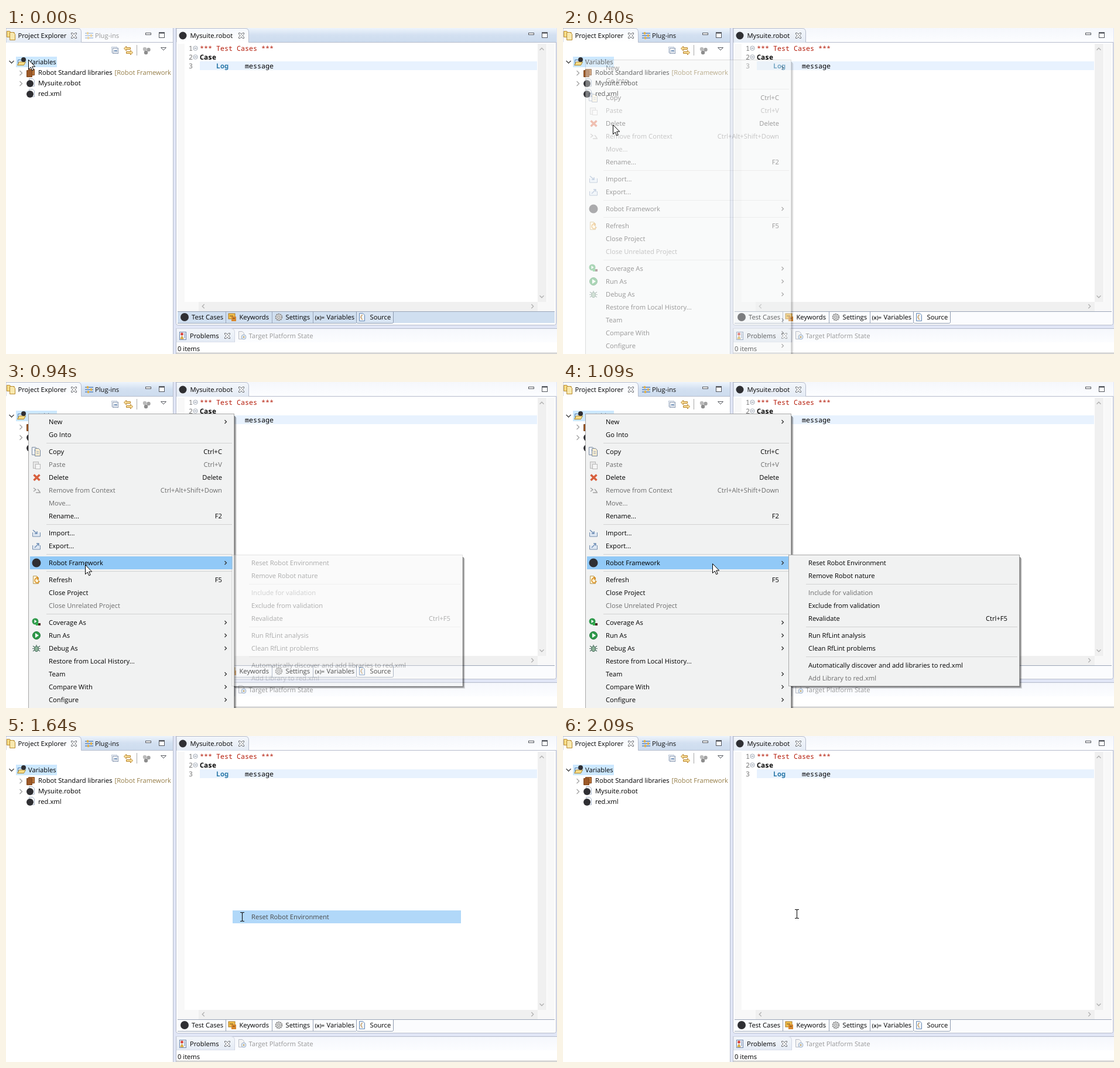
These frames come from a looping animation (941x557 px, 2.24 s). An HTML page:

```html
<!DOCTYPE html>
<html lang="en">
<head>
<meta charset="utf-8">
<title>Reset environment</title>
<style>
html, body { margin: 0; width: 100%; height: 100%; overflow: hidden; background: #fff; }
svg { display: block; width: 941px; height: 557px; }
text { font: 11.2px 'Open Sans', 'Noto Sans', sans-serif; text-rendering: geometricPrecision; white-space: pre; }
text.code { font: 11.667px 'Noto Sans Mono', 'DejaVu Sans Mono', monospace; }
text.bold { font-weight: 700; }
</style>
</head>
<body>
<svg id="stage" viewBox="0 0 941 557">
  <defs>
    <linearGradient id="on" x2="0" y2="1"><stop stop-color="#edf4fc"/><stop offset=".5" stop-color="#d3e0f1"/><stop offset="1" stop-color="#cddcee"/></linearGradient>
    <linearGradient id="off" x2="0" y2="1"><stop stop-color="#f5f7fc"/><stop offset="1" stop-color="#fcfdff"/></linearGradient>
    <linearGradient id="tab" x2="0" y2="1"><stop stop-color="#f5f8fd"/><stop offset="1" stop-color="#fff"/></linearGradient>
    <linearGradient id="tabOff" x2="0" y2="1"><stop stop-color="#f3f6fb"/><stop offset="1" stop-color="#e4ebf5"/></linearGradient>
  </defs>
</svg>
<script>
const LOOP = 2240;
const stage = document.getElementById('stage');
const EDGE = '#b6bccc', DIM = '#6d6d6d', PALE = '#a0a0a0', PICK = '#91c9f7', DARK = '#2f2f33';
let layer = stage;

function add(tag, attrs = {}, body = '') {
  const e = document.createElementNS('http://www.w3.org/2000/svg', tag);
  for (const k in attrs) e.setAttribute(k, attrs[k]);
  e.textContent = body;
  layer.appendChild(e);
  return e;
}
function group(draw) {
  const outer = layer, g = add('g');
  layer = g;
  draw();
  layer = outer;
  return g;
}
const rect = (x, y, width, height, fill, more = {}) => add('rect', { x, y, width, height, fill, ...more });
const path = (d, stroke, fill = 'none', width = 1) => add('path', { d, stroke, fill, 'stroke-width': width });
const dot = (cx, cy, r, fill = DARK, stroke = 'none') => add('circle', { cx, cy, r, fill, stroke });
// y is the middle of the line
const label = (x, y, s, fill = '#000', more = {}) => add('text', { x, y: y + 4, fill, ...more }, s);
const code = (x, y, s, fill, cls = '') => label(x, y, s, fill, { class: 'code ' + cls });

// Hold each value from its time until the next one.
function play(e, prop, table) {
  const frames = table.map(([t, v]) => ({ offset: t / LOOP, [prop]: v, easing: 'step-end' }));
  frames.push({ offset: 1, [prop]: table[table.length - 1][1] });
  e.animate(frames, { duration: LOOP, iterations: Infinity });
}
const move = (e, table) => play(e, 'transform', table.map(([t, x, y]) => [t, `translate(${x}px,${y}px)`]));
function swap(first, second, t) {
  play(first, 'opacity', [[0, 1], [t, 0]]);
  play(second, 'opacity', [[0, 0], [t, 1]]);
}

function closeMark(x, y) {
  path(`M${x - 4.5} ${y - 4.5}h2.5l2 2.5 2-2.5h2.5v2l-2.7 2.5 2.7 2.5v2h-2.5l-2-2.5-2 2.5h-2.5v-2l2.7-2.5-2.7-2.5z`, '#55585f', '#fff', .9);
}
function sizeMarks(x) {
  rect(x + .5, 8.5, 9, 3, '#fff', { stroke: '#55585f' });
  rect(x + 23.5, 7.5, 9, 9, '#fff', { stroke: '#55585f' });
  rect(x + 23, 7, 10, 2.5, '#55585f');
}
function chevron(x, y, stroke, dir, s = 3.5) {
  const d = { right: `M${x - s / 2} ${y - s}l${s} ${s}-${s} ${s}`, left: `M${x + s / 2} ${y - s}l-${s} ${s} ${s} ${s}`,
    down: `M${x - s} ${y - s / 2}l${s} ${s} ${s}-${s}`, up: `M${x - s} ${y + s / 2}l${s}-${s} ${s} ${s}` };
  path(d[dir], stroke, 'none', 1.3);
}
function sheet(x, y, fill = '#fff', stroke = '#8a98ad') {
  path(`M${x - 4.5} ${y - 6.5}h6l3 3v10h-9z`, stroke, fill);
}
function folder(x, y) {
  path(`M${x - 6.5} ${y + 5.5}v-10h5l1.5 2h6v8z`, '#b98b2d', '#f8dc85');
}
function sliders(x, y) {
  for (let i = -1; i < 2; i++) path(`M${x - 7} ${y + i * 4}h14`, '#5b86bd', 'none', 1.5);
  rect(x - 4, y - 6, 3, 4, '#e5b34a'); rect(x + 2, y - 2, 3, 4, '#e5b34a'); rect(x - 3, y + 2, 3, 4, '#e5b34a');
}

const barFill = on => on ? 'url(#on)' : 'url(#off)';
const tabFill = on => on ? 'url(#tab)' : 'url(#tabOff)';

function sideBar(on) {
  rect(0, 0, 285, 24, barFill(on));
  path('M0 24.5H285', EDGE);
  path('M0 25V.5H122Q128.5 .5 128.5 7V24.5', EDGE, tabFill(on));
  if (on) rect(0, 24, 128, 2, '#fff');
  group(() => sliders(142, 13)).setAttribute('opacity', on ? 1 : .5);
  label(152, 13, 'Plug-ins', on ? '#111' : '#999');
}
function editorBars(on) {
  rect(291, 0, 649, 24, barFill(on));
  path('M291 24.5H940', EDGE);
  path('M291 25V.5H408Q414.5 .5 414.5 7V24.5', EDGE, tabFill(on));
  if (on) rect(291, 24, 123, 2, '#fff');
  rect(293, 485, 644, 19, on ? '#d0dff0' : '#fbfcfe');
  path('M293 484.5H937M293 504.5H598', '#9aa5b8');
  path('M598.5 485V502.5Q598.5 504.5 600.5 504.5H659.5Q661.5 504.5 661.5 502.5V485', '#8c9ab0', on ? '#d9e5f3' : '#fff');
  for (const x of [375.5, 454.5, 524.5]) path(`M${x} 485V504`, '#9aa5b8');
}

function sidePanel() {
  folder(8, 10); sheet(11, 14, '#f8e8ae', '#b98b2d');
  label(20.5, 13, 'Project Explorer');
  closeMark(116, 13);
  sizeMarks(238);
  rect(182.5, 34.5, 9, 9, '#fff', { stroke: '#8797b0' });
  rect(180.5, 32.5, 9, 9, 'none', { stroke: '#b6c2d4' });
  path('M184.5 39h5', '#36649c', 'none', 1.4);
  path('M201.5 35l4-4v2.5h7v3h-7v2.5z', '#b7832c', '#fbe09b');
  path('M216.5 42l-4-4v2.5h-7v3h7v2.5z', '#b7832c', '#fbe09b');
  path('M223.5 29V47', '#a9a9a9');
  dot(237, 36, 3.2, '#bbb'); dot(243.5, 37, 3.2, '#a2a2a2'); dot(239, 42, 3.2, '#8d8d8d');
  path('M264.5 33.5h9l-4.5 4.5z', '#55585f', '#fff');

  rect(17, 49, 70, 18, '#cce8ff');
  chevron(9.5, 58, '#404040', 'down', 4);
  path('M20.5 63.5v-9h5l1.5 2h5v3', '#4d7cae', '#d8e8f8');
  path('M19.5 63.5l3-5.5h11l-3 5.5z', '#a7852f', '#f8dc85');
  dot(30, 54, 4);
  label(38, 58, 'Variables');
  chevron(25.5, 77, '#a2a2a2', 'right', 4);
  chevron(25.5, 95, '#a2a2a2', 'right', 4);
  path('M38.5 70.5h10v10h-10z', '#7b431b', '#bd783c');
  path('M35.5 72.5h9v11h-9z', '#7b431b', '#9c5928');
  label(55, 76, 'Robot Standard libraries');
  label(282, 76, '[Robot Framework', '#957d47', { 'text-anchor': 'end' });
  sheet(44, 93, '#f7f9fc', '#aab6c8'); dot(41, 95, 6);
  label(55, 94, 'Mysuite.robot');
  sheet(44, 111, '#f7f9fc', '#aab6c8'); dot(41, 113, 6);
  label(55, 112, 'red.xml');
}

function editor() {
  dot(302, 13, 6.5);
  label(314.5, 13, 'Mysuite.robot');
  closeMark(402, 13);
  sizeMarks(892);
  rect(293, 27, 12, 441, '#f8f8f8');
  rect(924, 27, 13, 457, '#f8f8f8');
  rect(293, 468, 644, 16, '#f8f8f8');
  rect(908, 27, 15, 441, '#f0f0f0');
  rect(329, 468, 579, 16, '#f0f0f0');
  chevron(915, 36, '#b0b0b0', 'up');
  chevron(915, 459, '#b0b0b0', 'down');
  chevron(337, 475.5, '#b0b0b0', 'left');
  chevron(899, 475.5, '#b0b0b0', 'right');
  rect(331, 57, 576, 15, '#e8f2fe');
  for (let i = 0; i < 3; i++) code(312, 35 + 15 * i, String(i + 1), '#787878');
  for (const y of [34.5, 49.5]) {
    dot(323.5, y, 3.6, '#fff', '#9aa3b0');
    path(`M321.5 ${y}h4`, '#7b8799');
  }
  code(331, 35, '*** Test Cases ***', '#b41a08');
  code(331, 50, 'Case', '#000', 'bold');
  code(359, 65, 'Log', '#2a78a8', 'bold');
  code(408, 65, 'message', '#000');

  dot(305, 494, 7);
  label(317, 494, 'Test Cases');
  rect(380, 488, 11, 9, '#f3c04d', { stroke: '#a87620' });
  rect(385, 493, 8, 8, '#d9882f');
  path('M382 492h6M387 496h4', '#5e451a');
  label(398.5, 494, 'Keywords');
  add('circle', { cx: 466, cy: 494, r: 5.3, fill: '#ddd', stroke: '#828282', 'stroke-width': 2, 'stroke-dasharray': '2.2 1.1' });
  dot(466, 494, 2, '#fff', '#777');
  label(477.5, 494, 'Settings');
  label(527.5, 493.5, '(x)=', '#333', { style: 'font-size:9px;font-weight:700' });
  label(547.5, 494, 'Variables');
  sheet(608, 494, '#eef4fb', '#6487b3');
  path('M609 490q-2 0-2 2t-1.5 2q1.5 0 1.5 2t2 2', '#c07c24');
  label(621.5, 494, 'Source');
}

function problems() {
  rect(291, 513, 650, 24, barFill(false));
  path('M290.5 557V513.5H941', EDGE);
  path('M291 513.5H384Q390.5 513.5 390.5 520V537H291z', '#d0d5e2', tabFill(false));
  rect(291, 537, 650, 20, '#fff');
  rect(296.5, 519.5, 11, 13, '#f4f7fc', { stroke: '#6e86aa' });
  dot(300.5, 523, 2.4, '#d8423a');
  path('M298 531l2.5-4.5 2.5 4.5z', '#b88720', '#f3c94f');
  path('M305 521v9', '#6e86aa');
  label(314, 526, 'Problems');
  closeMark(378, 526);
  sheet(402, 525, '#f4f4f4', '#b8bdc8');
  dot(406, 528, 4, '#dfe8f2', '#9fb3cc');
  dot(406, 528, 1.3, '#c6a35c');
  label(414.5, 526, 'Target Platform State', '#999');
  label(293, 548, '0 items');
  path('M291 555.5H941', '#a0a0a0');
}

function panel(x, y, w, h) {
  rect(x + .5, y + .5, w - 1, h - 1, '#f1f2f2', { stroke: '#a8a8a8' });
}
function shadow(x, y, w, h) {
  for (let i = 0; i < 4; i++)
    path(`M${x + w + i + .5} ${y + 4 + i}V${y + h + i + .5}H${x + 4 + i}`, `rgba(0,0,0,${.52 - i * .14})`);
}
// Rows are [text, shortcut or '>', disabled]; null is a separator.
function rows(list, x, top, right) {
  let y = top;
  for (const row of list) {
    if (!row) {
      path(`M${x - 4} ${y - 7.5}H${right}`, '#d2d2d2');
      y += 7;
      continue;
    }
    const [s, key, off] = row, fill = off ? DIM : '#000';
    label(x, y, s, fill);
    if (key === '>') chevron(right - 11, y, '#333', 'right', 3);
    else if (key) label(right - 17, y, key, fill, { 'text-anchor': 'end' });
    y += 22;
  }
}

function menuIcons() {
  sheet(49, 118, '#f4f7fc', '#76879d'); sheet(54, 120, '#f8ecd0', '#76879d');
  path('M48 117h3M52 119h4M52 122h4', '#8ca0bb');
  rect(46.5, 136.5, 9, 11, '#e6e6e6', { stroke: '#b9b9b9' });
  rect(50.5, 140.5, 8, 8, '#f5f5f5', { stroke: '#b9b9b9' });
  path('M47.5 158.5l10 9.5M57.5 158.5l-10 9.5', '#d85f3d', 'none', 3.5);
  path('M47 181l4 3-4 3M51 189h8M54 183l4 5', PALE, 'none', 1.4);
  for (const y of [258, 280]) path(`M45.5 ${y - 1}v7h13v-7`, '#758dad', '#dfe8f3');
  path('M46 253l7 6m0-4v4h-4', '#6d8db5', 'none', 1.4);
  path('M49 283l7-7m-4 0h4v4', '#6d8db5', 'none', 1.4);
  dot(52, 309, 7.5);
  sheet(51, 338, '#fff5da', '#b99a55');
  path('M54 335a4 4 0 1 0 3 5M52 333l3 2-2 3', '#d99127', 'none', 1.7);
  dot(50, 409, 5.5, '#2f9a4b'); path('M48.5 406l4 3-4 3z', 'none', '#fff');
  rect(51, 412, 8, 4, '#4b2525'); rect(51, 412, 4, 4, '#2fb04b');
  dot(52, 433, 6.5, '#2f9a4b', '#1e7436'); path('M50 429l6 4-6 4z', 'none', '#fff');
  path('M46 451l12 9M58 451l-12 9M45 455.5h14M52 449v4', '#4f6f64', 'none', 1.2);
  add('ellipse', { cx: 52, cy: 456, rx: 3.2, ry: 4.5, fill: '#8fb59a', stroke: '#3f6656' });
}

rect(0, 0, 941, 557, '#e1e6f6');
rect(0, 0, 285, 557, '#fff');
path('M285.5 0V557', EDGE);
rect(290.5, -4.5, 649, 512, '#fff', { stroke: EDGE, rx: 3 });
const sideOff = group(() => sideBar(false));
const sideOn = group(() => sideBar(true));
const editorOn = group(() => editorBars(true));
const editorOff = group(() => editorBars(false));
sidePanel();
editor();
problems();

let menuPick, subPick;
const menu = group(() => {
  shadow(38, 54, 352, 520);
  panel(38, 54, 352, 520);
  menuPick = rect(41, -11, 346, 22, PICK);
  rows([['New', '>'], ['Go Into'], null, ['Copy', 'Ctrl+C'], ['Paste', 'Ctrl+V', 1], ['Delete', 'Delete'],
    ['Remove from Context', 'Ctrl+Alt+Shift+Down', 1], ['Move...', '', 1], ['Rename...', 'F2'], null,
    ['Import...'], ['Export...'], null, ['Robot Framework', '>'], null, ['Refresh', 'F5'], ['Close Project'],
    ['Close Unrelated Project', '', 1], null, ['Coverage As', '>'], ['Run As', '>'], ['Debug As', '>'],
    ['Restore from Local History...'], ['Team', '>'], ['Compare With', '>'], ['Configure', '>']], 73, 68, 386);
  menuIcons();
});
const subShadow = group(() => shadow(385, 295, 395, 225));
const sub = group(() => {
  panel(385, 295, 395, 225);
  rows([['Remove Robot nature'], null, ['Include for validation', '', 1], ['Exclude from validation'],
    ['Revalidate', 'Ctrl+F5'], null, ['Run RfLint analysis'], ['Clean RfLint problems'], null,
    ['Automatically discover and add libraries to red.xml'], ['Add Library to red.xml', '', 1]], 419, 331, 776);
});
const choice = group(() => {
  subPick = rect(387, 298, 390, 22, PICK);
  label(419, 309, 'Reset Robot Environment');
});
const arrow = group(() => path('M.5 .5V16.5L4.2 13 6.7 18.7 9.2 17.6 6.7 12H11.7Z', '#000', '#fff'));
const beam = group(() => path('M-3 -7.5H-.5L.5 -6.5 1.5 -7.5H4M.5 -7V7M-3 7.5H-.5L.5 6.5 1.5 7.5H4', '#111', 'none', 1.1));

const fadeIn = [[0, 0], [940, .32], [1010, .65], [1090, 1]];
swap(sideOff, sideOn, 250);
swap(editorOn, editorOff, 400);
play(menu, 'opacity', [[0, 0], [400, .4], [480, 1], [1640, 0]]);
play(menuPick, 'opacity', [[0, 0], [480, 1]]);
move(menuPick, [[0, 0, 229], [570, 0, 280], [650, 0, 338], [780, 0, 309]]);
play(subShadow, 'opacity', [[0, 0], [940, 1], [1640, 0]]);
play(sub, 'opacity', [...fadeIn, [1640, 0]]);
play(choice, 'opacity', [...fadeIn, [1640, .71], [1710, .45], [1790, .2], [1860, 0]]);
play(subPick, 'opacity', [[0, 0], [1240, 1]]);
move(arrow, [[0, 38, 54], [250, 42, 66], [320, 54, 96], [400, 85, 165], [480, 112, 235], [570, 130, 290],
  [650, 141, 328], [700, 141, 329], [780, 139, 317], [860, 136, 313], [940, 135, 312], [1010, 175, 311],
  [1090, 255, 310], [1160, 335, 310], [1240, 395, 311], [1320, 399, 310], [1400, 401, 308]]);
swap(arrow, beam, 1640);
move(beam, [[0, 403, 309], [2010, 401, 306], [2090, 399, 304]]);
</script>
</body>
</html>
```
